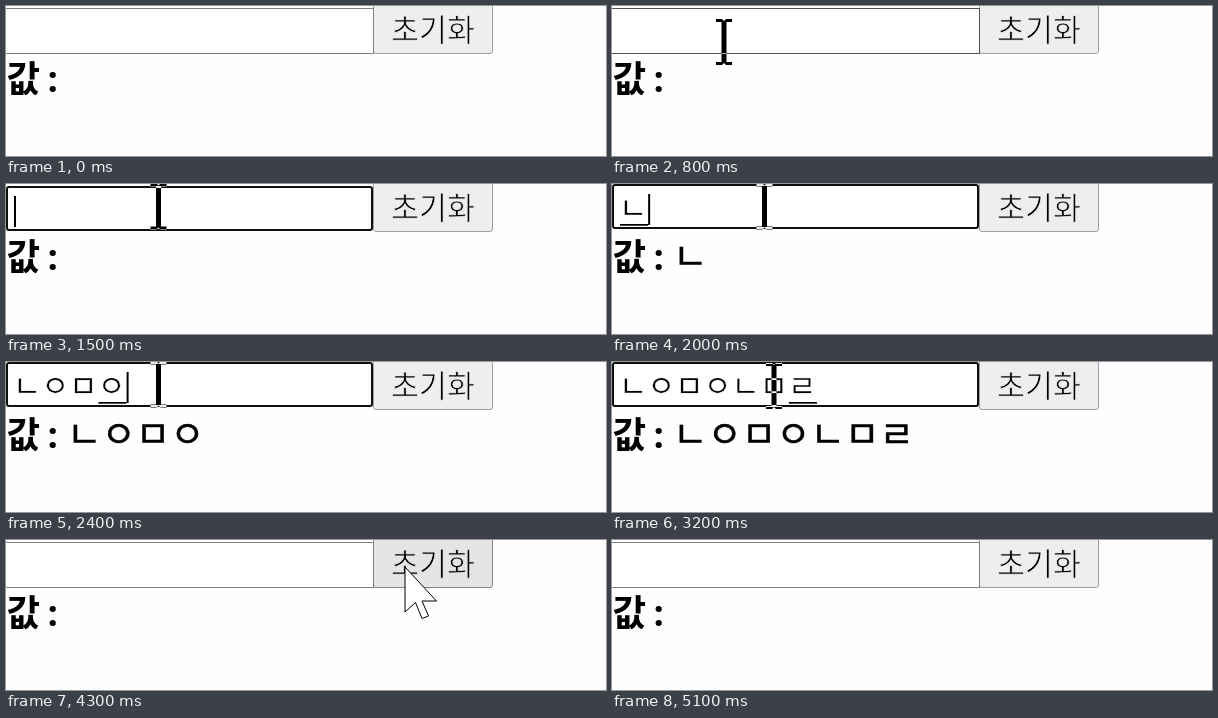
An HTML page for the animation above (5.9 s loop, 600 by 150 pixels).

```html
<!DOCTYPE html>
<html lang="ko">
<head>
<meta charset="utf-8">
<style>
  html, body { margin: 0; width: 100%; height: 100%; overflow: hidden; background: #fffdff; }
  svg { display: block; isolation: isolate; }
  text { font-family: "Noto Sans CJK KR", "Noto Sans CJK", sans-serif; white-space: pre; }
  .control { font-size: 30.4px; font-weight: 300; stroke-width: 0.8; }
  .heading { font-size: 36.5px; font-weight: 700; }
  .colon { font-family: "Noto Sans", sans-serif; }
  #typed { font-size: 30.6px; stroke: #fff; stroke-width: 0.4; }
  #value { font-size: 37.4px; stroke: #000; stroke-width: 0.5; }
  #beam { fill: #fff; mix-blend-mode: difference; }
</style>
</head>
<body>
<svg width="600" height="150" viewBox="0 0 600 150">
  <rect width="600" height="150" fill="#fffdff"/>
  <rect id="button" x="367.5" y="-6" width="119" height="53.5" rx="2.5"/>
  <text id="label" class="control" x="385" y="34.5">초기화</text>
  <g id="field">
    <rect id="box" fill="#fff"/>
    <text id="typed" class="control" x="7" y="37"></text>
    <rect id="underline" y="42" width="28" height="1.7"/>
    <rect id="caret" y="12" width="2" height="31"/>
  </g>
  <text class="heading" x="0.5" y="85.5">값</text>
  <text class="heading colon" x="41.5" y="86">:</text>
  <text id="value" x="61" y="86"></text>
  <g id="beam">
    <path d="M-8 -23H-2L0 -21L2 -23H8V-20H2.5V20H8V23H2L0 21L-2 23H-8V20H-2.5V-20H-8Z"/>
  </g>
  <path id="arrow" d="M0 0V45L10.5 35.5L17 51.5L23.5 49L17 34H31.5Z" fill="#fff" stroke="#000"/>
</svg>
<script>
const LOOP = 5900, TICK = 100;
const FOCUS = 1500, PRESS = 4100, CLEAR = 4300, LEAVE = 4800;
const PITCH = 28.15;

// [time, text entered so far]
const typing = [[0, ""], [1900, "ㄴ"], [2100, "ㄴㅇ"], [2200, "ㄴㅇㅁ"], [2400, "ㄴㅇㅁㅇ"],
  [2600, "ㄴㅇㅁㅇㄴ"], [2700, "ㄴㅇㅁㅇㄴㅁㄹ"], [CLEAR, ""]];

// [time, pointer shape, x, y]
const pointer = [
  [0, ""], [700, "arrow", 92, 57], [800, "beam", 112, 36], [900, "beam", 127, 19],
  [1000, "beam", 139, 9], [1100, "beam", 148, 7.5], [1200, "beam", 152, 19], [1300, "beam", 152.5, 22.5],
  [3200, "beam", 162, 24], [3300, "beam", 196, 28], [3400, "beam", 255, 29], [3500, "beam", 318, 24],
  [3600, "arrow", 371, 14], [3700, "arrow", 388, 14.5], [3800, "arrow", 394, 20], [3900, "arrow", 399, 27],
  [LEAVE, "arrow", 418, 53], [4900, ""]
];

const $ = id => document.getElementById(id);
const set = (id, attrs) => {
  for (const name in attrs) $(id).setAttribute(name, attrs[name]);
};
const show = (id, on) => set(id, { visibility: on ? "visible" : "hidden" });
const latest = (list, t) => list.findLast(item => item[0] <= t);
const within = (t, from, to) => t >= from && t < to;

function drawField(t) {
  const [since, text] = latest(typing, t);
  const focused = within(t, FOCUS, PRESS);
  const hovered = within(t, 800, 3600);
  const blinkOn = (t - Math.max(since, FOCUS)) % 1000 < 500;

  set("field", { transform: `translate(0 ${text ? -2 : 0})` });
  set("box", focused
    ? { x: 1, y: 3, width: 365, height: 43, rx: 2, stroke: "#101010", "stroke-width": 2 }
    : { x: -2, y: 2.5, width: 369.5, height: 45, rx: 0, stroke: hovered ? "#505050" : "#808080", "stroke-width": 1 });
  $("typed").textContent = $("value").textContent = text;
  set("underline", { x: 8 + PITCH * (text.length - 1) });
  show("underline", focused && text);
  set("caret", { x: 8 + PITCH * text.length });
  show("caret", focused && blinkOn);
}

function drawButton(t) {
  const pressed = within(t, PRESS, CLEAR);
  const hovered = within(t, 3600, LEAVE);
  const fill = pressed ? "#f5f5f5" : hovered ? "#e5e5e5" : "#efeeef";
  set("button", { fill, stroke: pressed ? "#b5b5b5" : hovered ? "#858585" : "#a0a0a0" });
  set("label", { stroke: fill }); // thins the strokes of the label
}

function drawPointer(t) {
  const [, shape, x, y] = latest(pointer, t);
  for (const id of ["beam", "arrow"]) {
    show(id, id === shape);
    if (id === shape) set(id, { transform: `translate(${x} ${y})` });
  }
}

function render(time) {
  const t = Math.floor((time % LOOP) / TICK) * TICK;
  drawField(t);
  drawButton(t);
  drawPointer(t);
}

const start = performance.now();
function frame() {
  render(performance.now() - start);
  requestAnimationFrame(frame);
}
frame();
</script>
</body>
</html>
```
